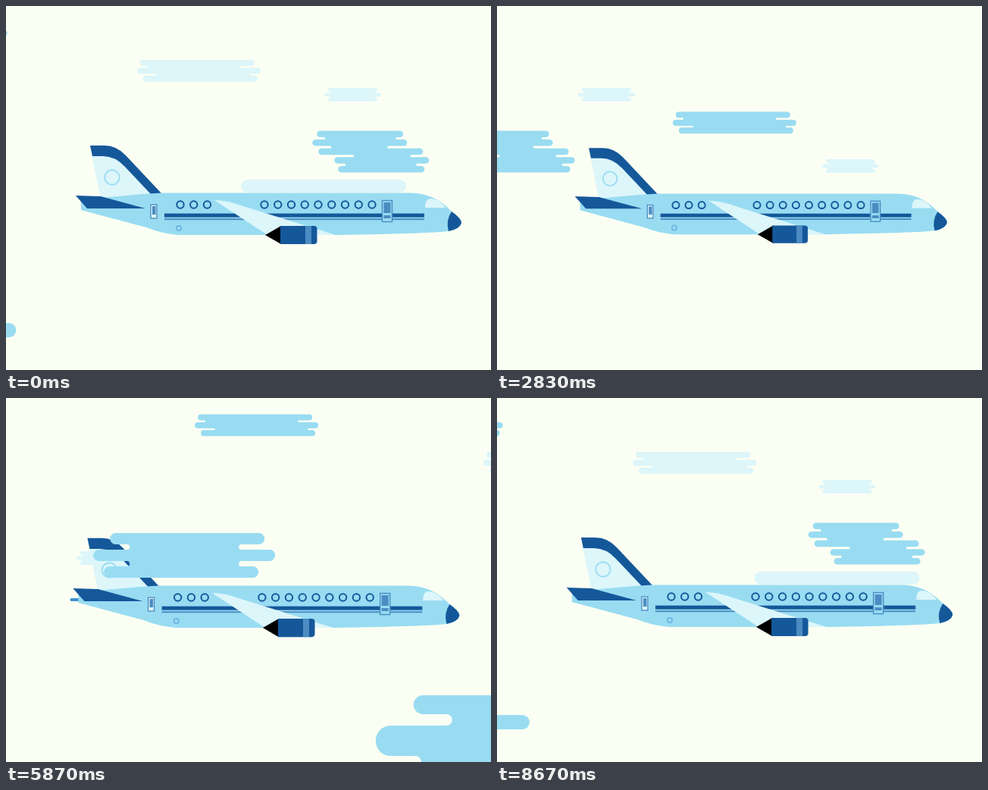
Write an HTML page with a canvas that moves like this. It is 640x480 px and loops after 8.71 s.

```html
<!DOCTYPE html>
<html>
<head>
<meta charset="utf-8">
<title>Airplane in flight</title>
<style>
html, body { margin: 0; width: 100%; height: 100%; overflow: hidden; background: #fbfff3 }
canvas { display: block }
</style>
</head>
<body>
<canvas id="stage" width="640" height="480"></canvas>
<script>
const ctx = document.getElementById('stage').getContext('2d');
const LOOP = 8710;
const BG = '#fbfff3', PALE = '#dcf6fa', SKY = '#99dcf2', DARK = '#15589a', MID = '#4c8cc2', DASH = '#3f8fd0';

// edge: left insets of rows and the hollow notches between them, in turn.
// The right side is the left side after a half turn. Heights repeat in a cycle.
function cloud(width, heights, edge) {
  let y = 0, right = '', left = '';
  edge.forEach((l, i) => {
    const h = heights[i % heights.length], rad = h / 2, notch = i % 2, d = notch ? -rad : rad;
    const r = width - edge[edge.length - 1 - i];
    const arc = `A${rad} ${rad} 0 0 ${1 - notch} `;
    right += `L${r - d} ${y}${arc}${r - d} ${y + h}`;
    left = `L${l + d} ${y + h}${arc}${l + d} ${y}` + left;
    y += h;
  });
  return new Path2D('M' + (right + left).slice(1) + 'Z');
}

const wide = cloud(163, [8, 2.4], [4, 14, 0, 27, 8]);
const small = cloud(75, [5, 1.5], [5, 9, 0, 8, 5]);
const stack = cloud(154, [8.5, 3.1], [6, 17, 0, 25, 8, 55, 29, 44, 34]);
const near = cloud(240, [15, 7], [22, 48, 0, 48, 14]);
const huge = cloud(450, [25, 15, 40, 15], [50, 101, 0, 60, 20]);
const band = cloud(218, [17], [0]);
const puff = cloud(74, [19], [0]);

// Speeds in px per ms, from the far layer to the near one
const FAR = .1106, MIDDLE = .1445, CLOSE = .161, QUICK = .74, RUSH = 1.8;

// [shape, colour, speed, y, time at which its left end meets the left border]
const back = [
  [wide, PALE, CLOSE, 71, 1075],
  [small, PALE, FAR, 108, 3799],
  [small, PALE, FAR, 202, 6709],
  [stack, SKY, CLOSE, 164.5, 2512],
  [wide, SKY, MIDDLE, 139.5, 4436],
  [wide, SKY, MIDDLE, 21.5, 7595],
  [band, PALE, QUICK, 229, 420]
];
const front = [
  [near, SKY, RUSH, 178, 5935],
  [near, SKY, RUSH, 399, 3500],
  [puff, SKY, QUICK, 418, 8629],
  ...[-1, 0, 1].map(i => [huge, SKY, RUSH, 392, 6142 + 1600 * i])
];

// Key poses: [time, scale, x, y]
const flight = [[0, 1, 0, 0], [1100, .974, 7, 10], [2830, .965, 14, 9.7],
  [3870, .976, 9.3, 2.5], [5870, 1.002, -3.8, .5], [7530, 1.022, -4.1, -1.1]];

const shape = (d, colour) => { ctx.fillStyle = colour; ctx.fill(new Path2D(d)); };
const box = (x, y, w, h, colour) => { ctx.fillStyle = colour; ctx.fillRect(x, y, w, h); };
function pill(x, y, w, h, colour, radius = h / 2) {
  ctx.fillStyle = colour;
  ctx.beginPath();
  ctx.roundRect(x, y, w, h, radius);
  ctx.fill();
}
function ring(x, y, r, colour, width) {
  ctx.strokeStyle = colour;
  ctx.lineWidth = width;
  ctx.beginPath();
  ctx.arc(x, y, r, 0, 7);
  ctx.stroke();
}
function frame(x, y, w, h) {
  ctx.strokeStyle = MID;
  ctx.lineWidth = 1.4;
  ctx.strokeRect(x, y, w, h);
}

function drawCloud([path, colour, speed, y, pass], t) {
  const ahead = (pass - t + 2000 + LOOP) % LOOP - 2000;
  ctx.save();
  ctx.translate(speed * ahead, y);
  ctx.fillStyle = colour;
  ctx.fill(path);
  ctx.restore();
}

// Streaks slip out from behind the tail, growing and then shrinking.
function drawStreaks(t) {
  for (let i = 0; i < 13; i++) {
    const p = (t - 500 - 560 * i) / 600;
    if (p <= 0 || p >= 1) continue;
    const len = 22 * Math.sin(Math.PI * p);
    const y = 235 + 67 * ((.9 + i * .618) % 1);
    pill(145 - 90 * p - len / 2, y - 2, len, 4, DASH);
  }
}

// Smooth periodic curve through the key poses
function pose(t) {
  const n = flight.length;
  const key = i => {
    const lap = Math.floor(i / n), [time, ...rest] = flight[i - lap * n];
    return [time + lap * LOOP, ...rest];
  };
  const i = flight.findLastIndex(k => k[0] <= t);
  const [a, b, c, d] = [key(i - 1), key(i), key(i + 1), key(i + 2)];
  const len = c[0] - b[0], u = (t - b[0]) / len;
  return [1, 2, 3].map(j => {
    const m0 = (c[j] - a[j]) / (c[0] - a[0]) * len;
    const m1 = (d[j] - b[j]) / (d[0] - b[0]) * len;
    const diff = c[j] - b[j];
    return b[j] + u * (m0 + u * (3 * diff - 2 * m0 - m1 + u * (m0 + m1 - 2 * diff)));
  });
}

function drawPlane(t) {
  const [s, x, y] = pose(t);
  ctx.save();
  ctx.translate(x, y);
  ctx.scale(s, s);

  // fin
  shape('M113 196L130 196Q145 199 157 211L193 249L125 254Z', PALE);
  shape('M111 184H130Q146 184 158 197L206 248H191L157 212Q144 198 128 198H114Z', DARK);
  ring(140, 226, 9.7, SKY, 1.8);

  // fuselage
  shape('M99 258L125 253L180 248L205 246.5H535Q566 247 588 271Q601 280 601 286Q599 294 584 297Q560 300 435 302H228Q205 300 185 292L99 269Z', SKY);
  shape('M588 271Q601 280 601 286Q599 294 584 297Q580 283 588 271Z', DARK);
  shape('M553 266Q553 254 560 254Q571 254 580 266Z', PALE);
  shape('M92 250L125 251L184 267H107Z', DARK);

  // stripes, windows, hatch
  box(209, 273.6, 343, 5, DARK);
  box(209, 280.2, 343, 2, MID);
  for (let i = 0; i < 15; i++) {
    if (i < 3 || i > 5) ring(230 + 17.75 * i + (i > 5 ? 4.5 : 0), 262, 4.7, DARK, 2);
  }
  ring(228, 293, 3.2, '#6db3e4', 1.8);

  // doors
  box(190.5, 261.5, 9, 19, PALE);
  frame(191, 262, 8, 18);
  box(193, 264, 4.5, 11, MID);
  box(496, 256, 14, 29, SKY);
  frame(496.5, 256.5, 13, 28);
  box(498.5, 259, 9, 14, MID);
  box(498.5, 276, 9, 4, MID);

  // wing and engine
  shape('M275 256Q291 256 310 263L435 302H345Z', PALE);
  shape('M342 302L363 290V314Z', '#000');
  pill(362, 290, 48.5, 24, DARK, [0, 4, 4, 0]);
  box(395, 290, 8, 24, MID);
  ctx.restore();
}

function draw(t) {
  box(0, 0, 640, 480, BG);
  back.forEach(c => drawCloud(c, t));
  drawStreaks(t);
  drawPlane(t);
  front.forEach(c => drawCloud(c, t));
}

const begin = performance.now();
function tick() {
  draw((performance.now() - begin) % LOOP);
  requestAnimationFrame(tick);
}
tick();
</script>
</body>
</html>
```
